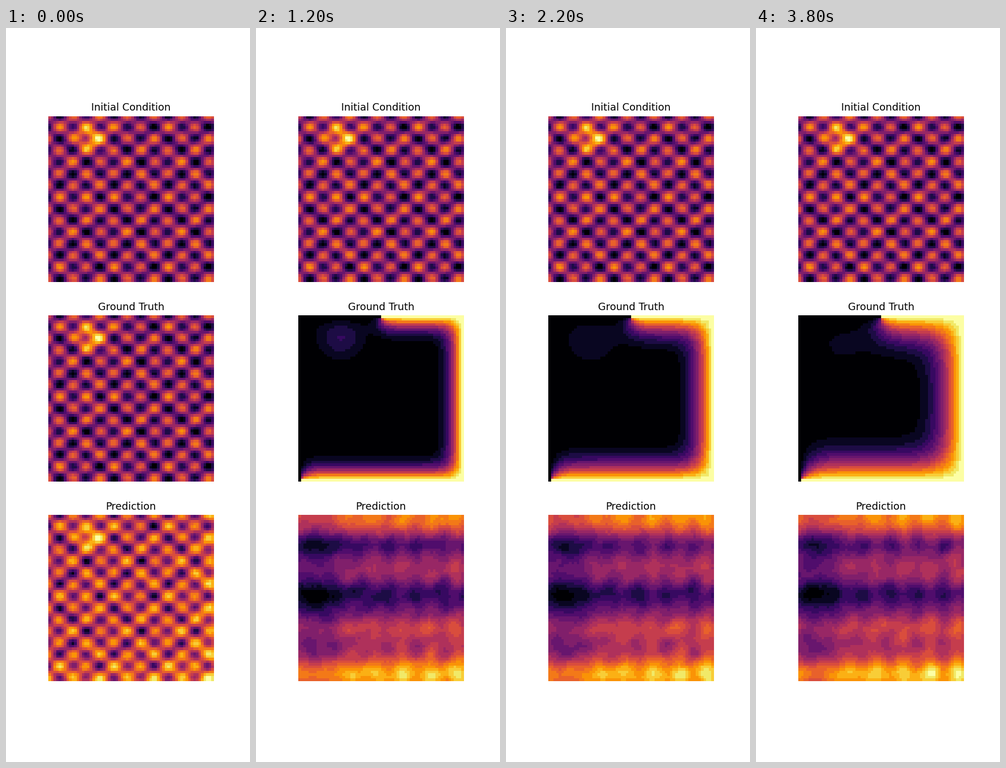
These frames come from a looping animation (427x1280 px, 4 s). A matplotlib script:

```python
import numpy as np
import matplotlib.pyplot as plt
from matplotlib.animation import FuncAnimation

N, FRAMES = 64, 20
DIFFUSION, SUBSTEPS = 1.95, 10
row, col = np.mgrid[0:N, 0:N].astype(float)


def bump(x, center, width):
    return np.exp(-((x - center) / width) ** 2 / 2)


def spot(r, c, width):
    return bump(row, r, width) * bump(col, c, width)


def wave(px, py, cx, cy):
    return np.cos(2 * np.pi * (col - cx) / px) * np.cos(2 * np.pi * (row - cy) / py)


def unit(a):
    return (a - a.min()) / (a.max() - a.min())


# Initial field: a checkered wave, a slower wave and two warm spots
checker = 0.34 * wave(10.51, 8.99, 3.74, 3.78)
swell = 0.09 * wave(21.02, 13.48, 6.37, 3.78)
spots = 0.44 * spot(7.2, 15.9, 4) + 0.17 * spot(31.6, 15.3, 2.45)
start = checker + swell + spots


def set_edges(u):
    u[0, :N // 2], u[0, N // 2:] = 0, 1
    u[-1] = 1
    u[:, -1] = 1
    u[:, 0] = 0


def solve():
    """Explicit heat equation with fixed hot and cold edges."""
    u, states = start.copy(), [unit(start)]
    k = DIFFUSION / SUBSTEPS
    for _ in range(FRAMES - 1):
        for _ in range(SUBSTEPS):
            set_edges(u)
            u[1:-1, 1:-1] += k * (u[2:, 1:-1] + u[:-2, 1:-1] + u[1:-1, 2:]
                                  + u[1:-1, :-2] - 4 * u[1:-1, 1:-1])
        states.append(np.clip(u, 0, 1))
    return states


def smooth(a):
    p = np.pad(a, 1, mode="edge")
    return sum(p[i:i + N, j:j + N] for i in range(3) for j in range(3)) / 9


rng = np.random.default_rng(5)
waves = [(rng.uniform(.2, .7), rng.uniform(-.7, .7), rng.uniform(0, 2 * np.pi),
          rng.uniform(-.2, .2)) for _ in range(14)]


def texture(n):
    drift = sum(np.cos(kx * col + ky * row + ph + w * n) for kx, ky, ph, w in waves)
    grain = np.random.default_rng(100 + n).normal(size=(N, N))
    return 0.007 * drift + 0.03 * smooth(grain)


# Horizontal bands of the prediction: row, width, early and late strength
BANDS = [(0, 5, .16, .28), (11, 3.3, -.32, -.19), (30, 3.6, -.28, -.26),
         (37, 3, -.12, -.06), (43, 3, .09, .10), (61, 4.2, .38, .39)]


def first_guess():
    corner = 0.14 * np.exp((row - N + 1) / 6) + 0.14 * np.exp((col - N + 1) / 4)
    tilt = 0.1 * (row + col) / (2 * N)
    return unit(checker + 1.4 * swell + 0.9 * spots + corner + tilt) ** 0.75


def predict(n):
    if n == 0:
        return first_guess()
    ease = 1 - np.exp(-(n - 1) / 4)
    bands = sum((a + (b - a) * ease) * bump(row, r, w) for r, w, a, b in BANDS)
    ramp = col / N
    stripes = 0.05 * ramp * np.cos(2 * np.pi * (col - 29.5) / 10.5)
    sides = 0.07 * ramp - 0.13 * bump(col, 7, 5.5) + stripes * (1 + bump(row, 61, 3))
    early = 0.16 * spot(5, 14, 2.6) + 0.35 * checker
    fade = np.exp(-(n - 1) / 1.5)
    p = 0.37 + 0.04 * ease + bands + sides + early * fade + texture(n)
    return np.clip(p, 0, 1)


truth = solve()
guess = [predict(n) for n in range(FRAMES)]

DPI = 128
fig, axes = plt.subplots(3, 1, figsize=(427 / DPI, 1280 / DPI), dpi=DPI)
cmap = plt.get_cmap("inferno").resampled(18)
images = []
for ax, title, data in zip(axes, ["Initial Condition", "Ground Truth", "Prediction"],
                           [truth[0], truth[0], guess[0]]):
    images.append(ax.imshow(data, cmap=cmap, vmin=0, vmax=1, interpolation="nearest"))
    ax.set_title(title, fontsize=10, pad=5.3, family="DejaVu Sans")
    ax.axis("off")


def update(n):
    images[1].set_data(truth[n])
    images[2].set_data(guess[n])
    return images[1:]


anim = FuncAnimation(fig, update, frames=FRAMES, interval=200, repeat=True,
                     repeat_delay=0, blit=False)
plt.show()
```
